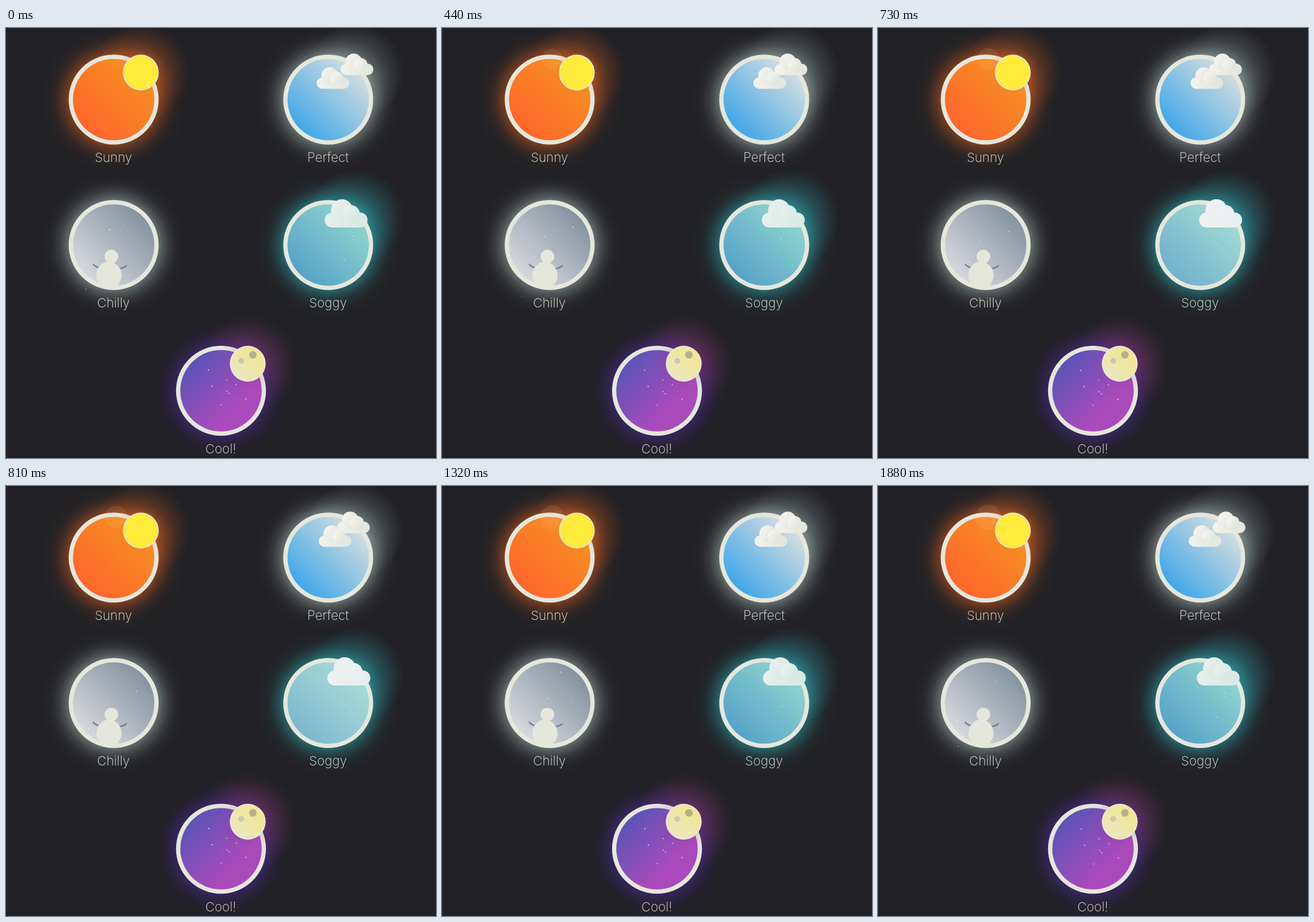
These frames come from a looping animation (748 by 748 pixels, 1.93 s). An HTML page with a canvas:

```html
<!DOCTYPE html>
<html lang="en">
<head>
<meta charset="utf-8">
<title>Weather badges</title>
<style>
html, body { margin: 0; width: 100%; height: 100%; overflow: hidden; background: #212125; }
canvas { display: block; }
</style>
</head>
<body>
<canvas id="stage" width="748" height="748"></canvas>
<script>
const ctx = document.getElementById('stage').getContext('2d');
const LOOP = 1930, TAU = Math.PI * 2, CREAM = '#e5e7dc';

// dir: 1 runs the gradient down right, -1 up right; reach: where it ends; halo: glow behind the corner ornament
const badges = [
  { label: 'Sunny', x: 187.3, y: 124.5, from: '#ff662c', to: '#f59122', glow: '#e2601c', halo: '#e2601c' },
  { label: 'Perfect', x: 560.5, y: 124.5, from: '#42a7e8', to: '#d2dde0', glow: '#b4c8c4', halo: '#8c9c99' },
  { label: 'Chilly', x: 187.3, y: 377.5, from: '#d6d7dd', to: '#8593a0', glow: '#b4c8c4' },
  { label: 'Soggy', x: 560.5, y: 377.5, from: '#56a3c8', to: '#90d4cf', glow: '#2fb3ba', halo: '#2fb3ba' },
  { label: 'Cool!', x: 374, y: 631, from: '#5b54b6', to: '#a94abb', glow: '#4e2ba0', halo: '#a0408c', dir: 1, reach: 25 }
];

const rand = n => {
  const v = Math.sin(n * 127.1) * 43758.5453;
  return v - Math.floor(v);
};
const sway = (t, mid, amp, peak) => mid + amp * Math.cos(TAU * (t - peak) / LOOP);
const bump = (t, peak, width) => Math.exp(-(((t - peak) / width) ** 2));

// Scatters seeded specks in a box.
const scatter = (count, seed, x, y, w, h) => Array.from({ length: count }, (_, i) => ({
  x: x + w * rand(seed + i),
  y: y + h * (i + rand(seed + i + 40)) / count,
  phase: rand(seed + i + 80)
}));
const flakes = scatter(7, 3, 112, 308, 130, 115);
const drops = scatter(6, 11, 570, 342, 46, 45);
const stars = scatter(9, 23, 346, 590, 90, 68);

function disc(x, y, r, fill, ry = r) {
  ctx.fillStyle = fill;
  ctx.beginPath();
  ctx.ellipse(x, y, r, ry, 0, 0, TAU);
  ctx.fill();
}

function glowDisc(x, y, r, fill, glow, blur) {
  ctx.save();
  ctx.shadowColor = glow;
  ctx.shadowBlur = blur;
  disc(x, y, r, fill);
  ctx.restore();
}

function blend(g, from, to) {
  g.addColorStop(0, from);
  g.addColorStop(1, to);
  return g;
}
const linear = (x0, y0, x1, y1, from, to) => blend(ctx.createLinearGradient(x0, y0, x1, y1), from, to);
const radial = (x, y, r, from, to) => blend(ctx.createRadialGradient(x, y, 0, x, y, r), from, to);

function badge({ label, x, y, from, to, glow, halo, dir = -1, reach = 50 }) {
  if (halo) disc(x + 47, y - 47, 85, radial(x + 47, y - 47, 85, halo + '90', halo + '00'));
  glowDisc(x, y, 78.2, CREAM, glow, 40);
  disc(x, y, 70.8, linear(x - 50, y - 50 * dir, x + reach, y + reach * dir, from, to));
  ctx.fillStyle = CREAM;
  ctx.fillText(label, x - .4, y + 108.5);
}

function cloud(x, y, scale, light, dark) {
  const lobe = (cx, cy, r) =>
    disc(cx, cy, r, linear(cx - r * .8, cy - r * .5, cx + r * .8, cy + r * .5, light, dark));
  ctx.save();
  ctx.translate(x, y);
  ctx.scale(scale, scale);
  ctx.fillStyle = linear(0, 23, 74, 49, light, dark);
  ctx.beginPath();
  ctx.roundRect(0, 23, 74.5, 26, 13);
  ctx.fill();
  lobe(30, 19, 19);
  lobe(45.5, 25.5, 15.5);
  ctx.restore();
}

function arm(x0, y0, cx, cy, x1, y1) {
  ctx.beginPath();
  ctx.moveTo(x0, y0);
  ctx.quadraticCurveTo(cx, cy, x1, y1);
  ctx.stroke();
}

// Each speck falls from its own phase and fades out.
function fall(t, specks, dx, dy, w, h) {
  ctx.fillStyle = '#eef2f1';
  for (const { x, y, phase } of specks) {
    const p = (t / LOOP + phase) % 1;
    ctx.globalAlpha = .9 * (1 - p);
    ctx.fillRect(x + dx * p, y + dy * p, w, h);
  }
  ctx.globalAlpha = 1;
}

function sunny(t) {
  const p = t / LOOP;
  const flare = `rgba(255,215,185,${.1 * p ** .2})`;
  disc(191.5, 54, 13 + 9 * p ** .4, flare);
  disc(198.5 + 2.5 * p, 62.5, 4, flare);
  glowDisc(234.5, 77.5, 31.2, CREAM, 'rgba(244,110,30,.35)', 20);
  disc(234.5, 77.5, 29.2, '#ffeb3b');
}

function perfect(t) {
  cloud(sway(t, 579, 3.2, 1840), 44.5, .765, '#f4f4ee', '#e1e5dc');
  cloud(sway(t, 542.4, 2.1, 1030), 68.3, .765, '#f4f4ee', '#e1e5dc');
}

function chilly(t) {
  ctx.strokeStyle = '#7e858d';
  ctx.lineWidth = 2.8;
  arm(151.5, 410.5, 155, 415, 161.5, 417);
  arm(197, 418.5, 204.5, 418, 210, 413);
  disc(179, 430, 22, CREAM, 23.5);
  disc(183.3, 397.5, 11.8, CREAM);
  fall(t, flakes, -7, 55, 2, 1.8);
}

function soggy(t) {
  disc(560.5, 377.5, 70.8, `rgba(240,242,228,${.26 * bump(t, 800, 110)})`);
  fall(t, drops, -6, 65, 1.2, 2);
  const x = sway(t, 557, 2.6, 1000);
  cloud(x, 298, 1, '#e8f0ed', '#d7e8e3');
  ctx.globalAlpha = bump(t, 740, 200);
  cloud(x, 298, 1, '#edf1f1', '#e9eeee');
  ctx.globalAlpha = 1;
}

function cool(t) {
  const p = t / LOOP;
  glowDisc(420.5, 584, 31.2, CREAM, 'rgba(150,50,125,.35)', 30);
  disc(420.5, 584, 29.3, linear(400, 604, 436, 566, '#eae6c0', '#f1e794'));
  disc(429.5, 568.5, 6.6, '#b5b08c');
  disc(409.3, 579.3, 5, '#cbc7b3');
  for (const { x, y, phase } of stars)
    disc(x + p, y + 2 * p, 1.15, `rgba(238,236,232,${.45 + .5 * phase})`);
}

function frame(t) {
  ctx.fillStyle = '#212125';
  ctx.fillRect(0, 0, 748, 748);
  ctx.font = '200 22.3px Inter, Lato, sans-serif';
  ctx.textAlign = 'center';
  badges.forEach(badge);
  for (const scene of [sunny, perfect, chilly, soggy, cool]) scene(t);
}

const start = performance.now();
function tick() {
  frame((performance.now() - start) % LOOP);
  requestAnimationFrame(tick);
}
tick();
</script>
</body>
</html>
```
